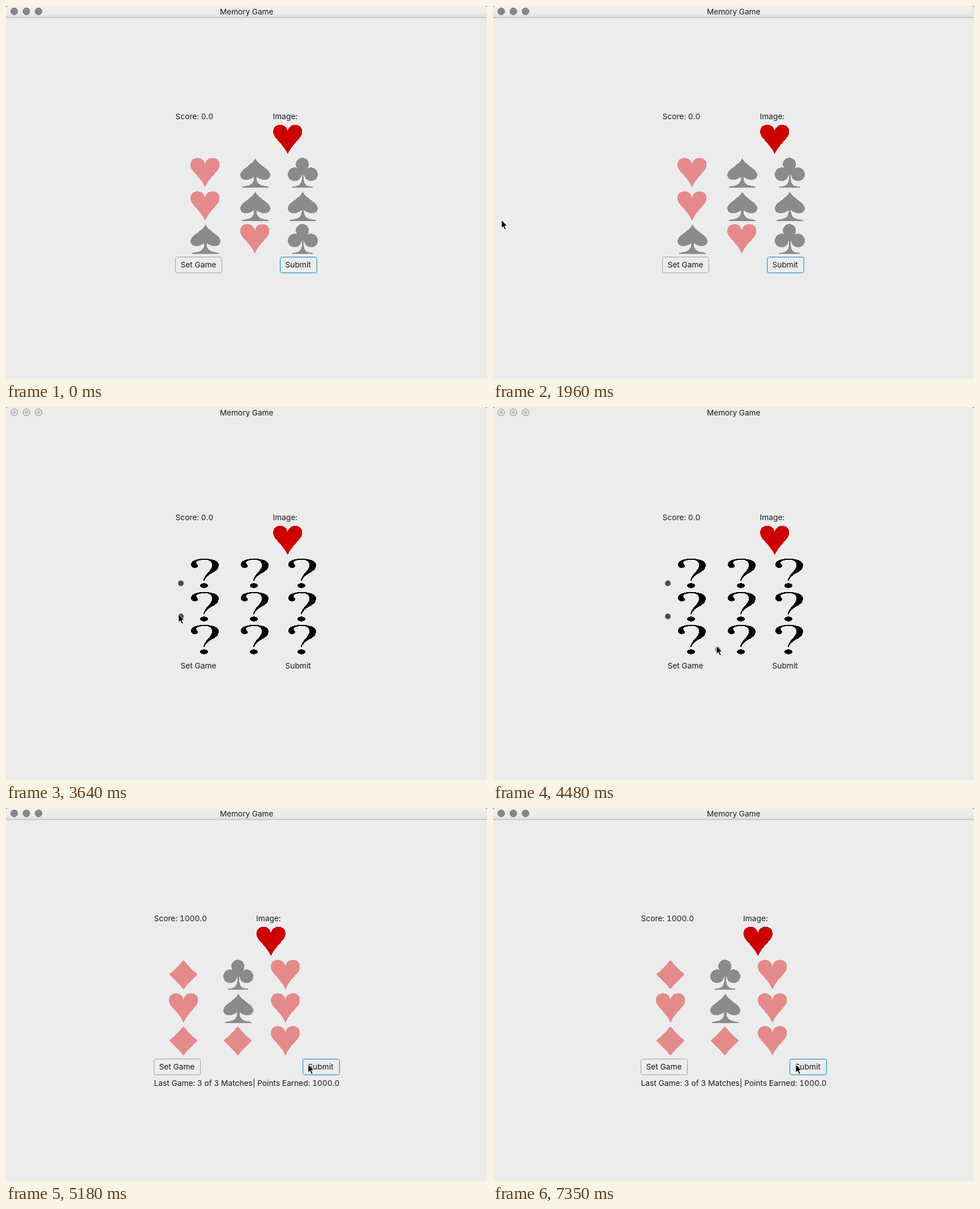
These frames come from a looping animation (850x659 px, 7.91 s). An HTML page:

```html
<!DOCTYPE html>
<html lang="en">
<head>
<meta charset="utf-8">
<title>Memory Game</title>
<style>
  html, body { margin: 0; width: 100%; height: 100%; overflow: hidden; background: #ececec; }
  svg { display: block; width: 100%; height: 100%; }
  text { font: 13.75px Inter, "Open Sans", sans-serif; font-variant-numeric: tabular-nums; fill: #1c1c1c; }
  .title { font-size: 13.55px; }
  use { shape-rendering: crispEdges; }
</style>
</head>
<body>
<svg id="stage" viewBox="0 0 850 659">
  <defs>
    <linearGradient id="bar" x2="0" y2="1">
      <stop offset="0" stop-color="#f0f0f0"/>
      <stop offset=".7" stop-color="#ebebeb"/>
      <stop offset="1" stop-color="#dedede"/>
    </linearGradient>
    <path id="heart" d="M25.700 11C24 3.500 18.500 .3 12.500 .3C5 .3 0 5 0 12C0 17 2 20.500 5 24L15 35.500C19.500 41 23.500 46.500 25.700 52C28 46.500 32 41 36.500 35.500L46.500 24C49.500 20.500 51.500 17 51.500 12C51.500 5 46.500 .3 39 .3C33 .3 27.500 3.500 25.700 11Z"/>
    <path id="diamond" d="M25.500 .5Q37 15 51 26Q37 38 25.500 52Q14 38 0 26Q14 15 25.500 .5Z"/>
    <path id="spade" d="M26.500 1C24 7 17 12 10 17.500C4 22 0 25.500 0 31C0 36 4 39 10 39C16 39 21 37 24.500 33.500C25.500 41 22 46 16 48.500C12 50 6 50.500 3 51.200V53H50V51.200C47 50.500 41 50 37 48.500C31 46 27.500 41 28.500 33.500C32 37 37 39 43 39C49 39 53 36 53 31C53 25.500 49 22 43 17.500C36 12 29 7 26.500 1Z"/>
    <g id="club">
      <circle cx="25.700" cy="11.700" r="11.500"/>
      <circle cx="12" cy="29.300" r="12"/>
      <circle cx="41" cy="29.300" r="12"/>
      <path d="M21 20H31L34 30H18ZM25 29H28C27.500 40 29 47 34 49.500C38 50.800 41 50.800 44 51.500V53H8V51.500C11 50.800 14 50.800 18 49.500C24 47 25.500 40 25 29Z"/>
    </g>
    <g id="query">
      <path d="M1 10C1 3 12 0 24 0C40 0 50 4 50 12C50 19 44 22.500 37 26C31 29.500 27 33 25 38.500H23C23.500 34 26 30 31 24.500C35.500 19.500 38 16 38 11C38 5 34 1.800 25 1.800C17 1.800 11 4 10 7C10.500 9 13 10.500 13 13C13 15.500 10 16.500 7.500 16.500C3.500 16.500 1 14 1 10Z"/>
      <ellipse cx="24" cy="47.500" rx="7.200" ry="4.200"/>
    </g>
  </defs>
  <rect width="850" height="659" fill="#ececec"/>
  <g id="scenes"></g>
  <path d="M0 0H2L0 2ZM850 0H848L850 2Z" fill="#555"/>
  <text class="title" x="425.200" y="15" text-anchor="middle">Memory Game</text>
  <g id="dots" fill="#514a48">
    <circle cx="309" cy="311.500" r="5"/>
    <circle cx="309" cy="370" r="5"/>
    <circle cx="397" cy="428.500" r="5"/>
  </g>
  <g id="resize">
    <path d="M0 380H10M1.500 375V385M7 376L11 380L7 384" fill="none" stroke="#fff" stroke-width="4"/>
    <path d="M0 380H10M1.500 376V384" fill="none" stroke="#000" stroke-width="2"/>
    <path d="M7 375.500L12 380L7 384.500Z"/>
  </g>
  <path id="arrow" d="M0 0V14.500L3.300 11.500L5.800 17.300L8.200 16.200L5.700 10.600H10Z" fill="#000" stroke="#fff" stroke-width=".9"/>
</svg>
<script>
const LOOP = 7910, STEP = 70;
const HIDE = 2380, REVEAL = 5180;
const PICKS = [2940, 3570, 4480];
const ROWS = [268, 327, 385];
const COLORS = { heart: "#e58a8b", diamond: "#e58a8b", spade: "#8b8b8b", club: "#8b8b8b", query: "#000" };

// Pointer stops: time, x, y
const PATH = [
  [1890, 0, 380], [2380, 265, 345], [2590, 319, 335], [2870, 307, 309], [3080, 307, 309],
  [3500, 305, 366], [3780, 305, 366], [4410, 395, 422], [4550, 395, 422],
  [4970, 534, 453], [7210, 534, 453], [7280, 535, 453]
];

const $ = id => document.getElementById(id);
const show = (el, on) => el.setAttribute("display", on ? "inline" : "none");
const use = (name, x, y, color) => `<use href="#${name}" x="${x}" y="${y}" fill="${color}"/>`;
const label = (x, y, s) => `<text x="${x}" y="${y}">${s}</text>`;

function titleBar(active) {
  const lights = [14.5, 36, 57.5].map(x => active
    ? `<circle cx="${x}" cy="9.500" r="6" fill="#888" stroke="#686868"/>`
    : `<circle cx="${x}" cy="9.500" r="6" fill="#e6e6e6" stroke="#858585"/>
       <circle cx="${x}" cy="9.500" r="3" fill="#c2c2c2"/>`).join("");
  const bar = `<rect width="850" height="20" fill="url(#bar)"/><rect y="20" width="850" height="1" fill="#b2b2b2"/>`;
  return (active ? bar : "") + lights;
}

function button(x, w, focus) {
  const box = (d, color) =>
    `<rect x="${x + d}" y="${443.5 + d}" width="${w - 2 * d}" height="${28 - 2 * d}" rx="3" fill="none" stroke="${color}"/>`;
  return focus ? box(0, "#2492c4") + box(1, "#c2dce8") : box(0, "#a0a0a0");
}

function scene(s) {
  const cards = s.cards.map((name, i) =>
    use(name, s.cols[i % 3], ROWS[Math.floor(i / 3)], COLORS[name])).join("");
  const g = document.createElementNS("http://www.w3.org/2000/svg", "g");
  g.innerHTML = titleBar(s.active) + cards +
    (s.active ? button(s.left + .5, 82, false) + button(s.submit + .5, 65, true) : "") +
    label(s.left + .5, 200, "Score: " + s.score) + label(s.image, 200, "Image:") +
    use("heart", s.image + .5, 209.5, "#cd0000") +
    label(s.left + 9.5, 462, "Set Game") + label(s.submit + 9.5, 462, "Submit") +
    (s.note ? label(s.left + .5, 491, s.note) : "");
  $("scenes").append(g);
  return g;
}

const first = { left: 299, image: 471.5, submit: 484, cols: [326, 414, 498], score: "0.0" };
const scenes = [
  scene({ ...first, active: true, cards:
    ["heart", "spade", "club", "heart", "spade", "spade", "spade", "heart", "club"] }),
  scene({ ...first, active: false, cards: Array(9).fill("query") }),
  scene({ left: 261, image: 442, submit: 524, cols: [288, 384, 468], score: "1000.0", active: true,
    cards: ["diamond", "club", "heart", "heart", "spade", "heart", "diamond", "diamond", "heart"],
    note: "Last Game: 3 of 3 Matches| Points Earned: 1000.0" })
];
const dots = [...$("dots").children];

function pointer(t) {
  const i = PATH.findIndex(p => p[0] > t);
  if (i < 0) return PATH[PATH.length - 1].slice(1);
  const [t0, x0, y0] = PATH[i - 1], [t1, x1, y1] = PATH[i];
  const u = (t - t0) / (t1 - t0), e = u * u * (3 - 2 * u);
  return [x0 + (x1 - x0) * e, y0 + (y1 - y0) * e];
}

function draw(now) {
  const t = Math.floor((now % LOOP) / STEP) * STEP;
  const current = t < HIDE ? 0 : t < REVEAL ? 1 : 2;
  scenes.forEach((g, i) => show(g, i === current));
  dots.forEach((dot, i) => {
    show(dot, current === 1 && t >= PICKS[i]);
    dot.setAttribute("opacity", t < PICKS[i] + STEP ? .5 : 1);
  });
  show($("resize"), t === PATH[0][0]);
  show($("arrow"), t > PATH[0][0]);
  if (t > PATH[0][0]) $("arrow").setAttribute("transform", `translate(${pointer(t).map(Math.round)})`);
}

let start;
function tick(now) {
  start ??= now;
  draw(now - start);
  requestAnimationFrame(tick);
}
draw(0);
requestAnimationFrame(tick);
</script>
</body>
</html>
```
